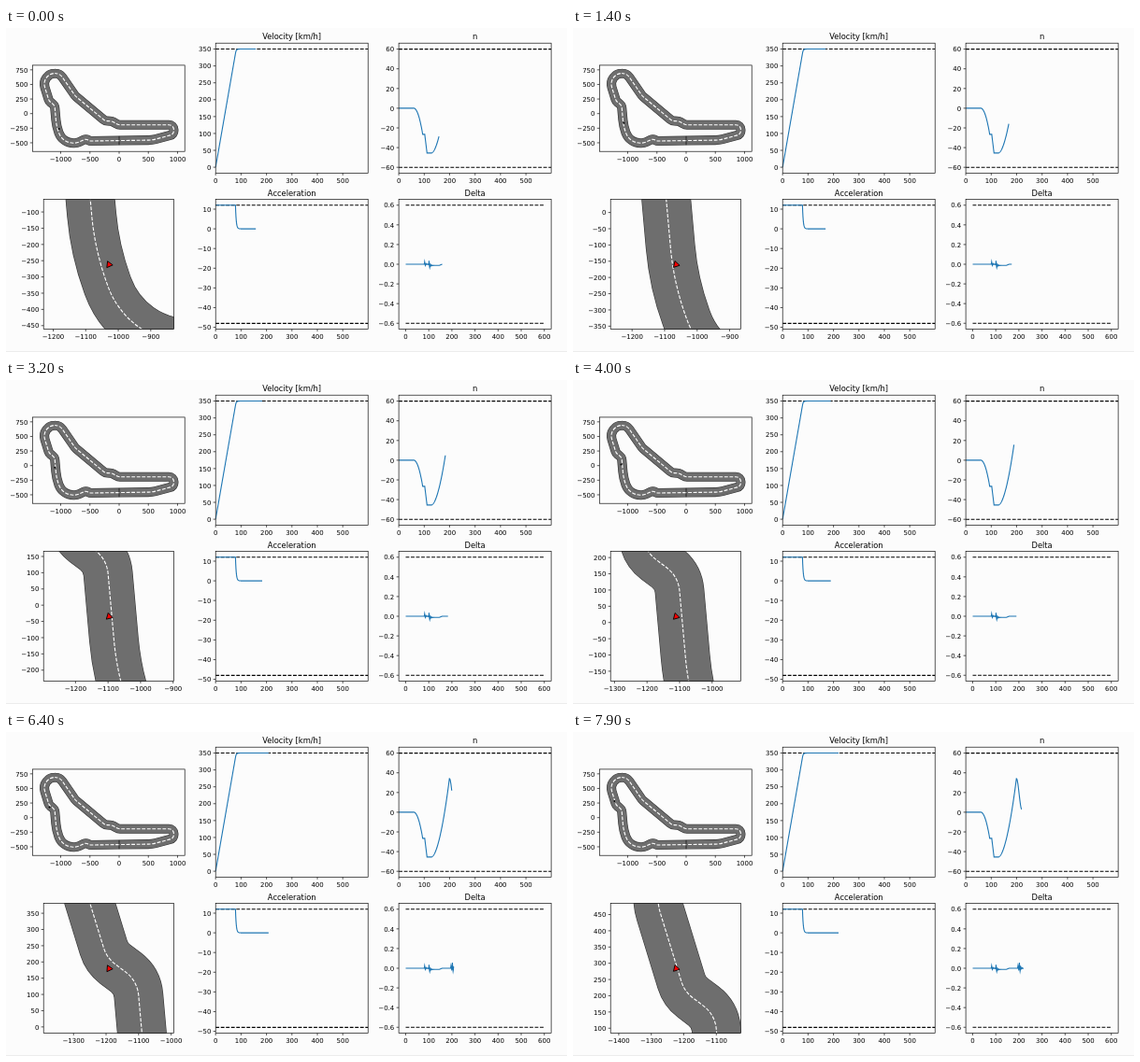
Write an HTML page with a canvas that moves like this. It is 600 px wide and 347 px high and loops after 8000 ms.

```html
<!DOCTYPE html>
<html>
<head>
<meta charset="utf-8">
<style>
html, body { margin: 0; width: 100%; height: 100%; overflow: hidden; background: #fcfcfc; }
canvas { display: block; }
</style>
</head>
<body>
<canvas id="stage" width="600" height="347"></canvas>
<script>
const ctx = document.getElementById('stage').getContext('2d');
const FONT = '"DejaVu Sans", sans-serif';
const PT = 50 / 72;                       // pixels per typographic point
const LINE = 1.6 * PT, THIN = .95 * PT;
const DASH = [5.55 * PT, 2.4 * PT];
const BLUE = '#1f77b4';

const ramp = (s, from, to) => Math.min(1, Math.max(0, (s - from) / (to - from)));
const smooth = (s, from, to) => {
  const x = ramp(s, from, to);
  return x * x * (3 - 2 * x);
};
const range = (from, to, step) => {
  const list = [];
  for (let v = Math.ceil(from / step) * step; v <= to + 1e-9; v += step) list.push(v);
  return list;
};

// Straights of the circuit meet in these corners: x, y, radius in metres
const corners = [
  [-500, -470, 80], [-568, -430, 80], [-720, -504, 200], [-968, -504, 265],
  [-1072, -218, 850], [-1104, 142, 100], [-1198, 213, 100], [-1345, 692, 185],
  [-1018, 692, 160], [-750, 302, 150], [-240, -124, 120], [-120, -130, 120],
  [-20, -192, 120], [935, -192, 82], [935, -355, 82], [560, -454, 500]
];
const START = [0, -462], ROAD = 150;

const circuit = new Path2D();
circuit.moveTo(...START);
corners.forEach(([x, y, r], i) => {
  const [nx, ny] = corners[i + 1] || START;
  circuit.arcTo(x, y, nx, ny, r);
});
circuit.closePath();

// Car position: tick, x, y; the outer two only set the direction at the ends
const drive = [
  [-10, -993, -327], [0, -1029.5, -260.6], [14, -1066, -159], [23, -1083.3, -94],
  [40, -1112, 19.6], [53, -1141, 110], [64, -1192, 181], [79, -1225, 285], [90, -1245, 365]
];

// Cubic Hermite curve through the waypoints
function carAt(u) {
  let i = 1;
  while (i < drive.length - 3 && drive[i + 1][0] < u) i++;
  const [a, b, c, d] = drive.slice(i - 1, i + 3);
  const h = c[0] - b[0], s = (u - b[0]) / h, r = 1 - s;
  return [1, 2].map(k => {
    const m0 = (c[k] - a[k]) / (c[0] - a[0]) * h;
    const m1 = (d[k] - b[k]) / (d[0] - b[0]) * h;
    return b[k] * (1 + 2 * s) * r * r + m0 * s * r * r + c[k] * s * s * (3 - 2 * s) - m1 * s * s * r;
  });
}

// Signals over the simulation step
const LAUNCH = 78, FADE = 3;
const accel = s => s < LAUNCH ? 12 : 12 * Math.exp((LAUNCH - s) / FADE);
const speed = s => s < LAUNCH ? 4.32 * s : 350 - 13 * Math.exp((LAUNCH - s) / FADE);
const offset = s =>
  -26.5 * ramp(s, 59, 94) ** 2 - 19 * ramp(s, 102, 111)
  + 79.5 * ramp(s, 128, 199) ** 1.8 - 31 * smooth(s, 199.5, 220);
const kick = (s, at, size) =>
  s < at - 1.5 ? 0 : size * Math.exp(-Math.abs(s - at) / 5) * Math.cos(s - at);
const steering = s =>
  kick(s, 82, .025) + kick(s, 101, .042) + kick(s, 196, .025) + kick(s, 202, .05)
  - .012 * smooth(s, 95, 105) * (1 - smooth(s, 143, 160));

function line(points, color, width, dash = []) {
  ctx.beginPath();
  for (const [x, y] of points) ctx.lineTo(x, y);
  ctx.strokeStyle = color;
  ctx.lineWidth = width;
  ctx.setLineDash(dash);
  ctx.stroke();
  ctx.setLineDash([]);
}

function text(str, x, y, size, align) {
  ctx.font = size * PT + 'px ' + FONT;
  ctx.textAlign = align;
  ctx.fillStyle = '#000';
  ctx.fillText(str, x, y);
}

const label = (v, digits) => v.toFixed(digits).replace('-', '\u2212');

// box: l, t, r, b; ox, oy: pixel of the value zero; kx, ky: pixels per unit
function axes(p, paint) {
  const px = v => p.ox + v * p.kx, py = v => p.oy - v * p.ky;
  ctx.save();
  ctx.beginPath();
  ctx.rect(p.l, p.t, p.r - p.l, p.b - p.t);
  ctx.clip();
  paint(px, py);
  ctx.restore();
  ctx.strokeStyle = '#000';
  ctx.lineWidth = THIN;
  ctx.strokeRect(p.l, p.t, p.r - p.l, p.b - p.t);
  for (const v of p.xt) {
    line([[px(v), p.b], [px(v), p.b + 2.5]], '#000', THIN);
    text(label(v, 0), px(v), p.b + 10.3, 10, 'center');
  }
  for (const v of p.yt) {
    line([[p.l - 2.5, py(v)], [p.l, py(v)]], '#000', THIN);
    text(label(v, p.digits || 0), p.l - 4.9, py(v) + 2.7, 10, 'right');
  }
  if (p.title) text(p.title, (p.l + p.r) / 2, p.t - 3.8, 12, 'center');
}

function drawTrack(p) {
  const k = p.kx;
  ctx.save();
  ctx.translate(p.ox, p.oy);
  ctx.scale(k, -k);
  const layers = [['#333', ROAD + .7 / k], ['#6e6e6e', ROAD - .5 / k], ['#fff', LINE / k]];
  layers.forEach(([color, width], i) => {
    ctx.strokeStyle = color;
    ctx.lineWidth = width;
    ctx.setLineDash(i === 2 ? DASH.map(d => d / k) : []);
    ctx.stroke(circuit);
  });
  ctx.restore();
}

const upper = { t: 16.2, b: 155.4 }, lower = { t: 183.4, b: 322.5 };
const column = l => ({ l, r: l + 163, ox: l, kx: .272, xt: range(0, 500, 100) });
const left = column(224.2), right = column(420.1);
const plots = [
  { ...left, ...upper, title: 'Velocity [km/h]', signal: speed, oy: 149.1, ky: .3616,
    yt: range(0, 350, 50), limits: [350] },
  { ...right, ...upper, title: 'n', signal: offset, oy: 85.9, ky: 1.055,
    yt: range(-60, 60, 20), limits: [60, -60] },
  { ...left, ...lower, title: 'Acceleration', signal: accel, oy: 215.1, ky: 2.109,
    yt: range(-50, 10, 10), limits: [12, -48] },
  { ...right, ...lower, title: 'Delta', signal: steering, oy: 253, ky: 105.4, digits: 1,
    ox: 427.5, kx: .247, xt: range(0, 600, 100),
    yt: range(-3, 3, 1).map(i => i / 5), limits: [.6, -.6] }
];

function drawPlot(p, step) {
  axes(p, (px, py) => {
    for (const v of p.limits) line([[px(0), py(v)], [px(600), py(v)]], '#000', LINE, DASH);
    const steps = [...range(0, step, 1), step];
    line(steps.map(s => [px(s), py(p.signal(s))]), BLUE, LINE);
  });
}

const overview = {
  l: 28.3, t: 39.9, r: 191.2, b: 132.2, ox: 121, oy: 91.7, kx: .0625, ky: .0625,
  xt: range(-1000, 1000, 500), yt: range(-500, 750, 250)
};

function drawOverview(x, y) {
  axes(overview, (px, py) => {
    drawTrack(overview);
    line([-75, 75].map(d => [px(0), py(START[1] + d)]), '#000', THIN);
    ctx.fillStyle = '#000';
    ctx.beginPath();
    ctx.arc(px(x), py(y), 1, 0, 7);
    ctx.fill();
  });
}

function drawCloseUp(x, y, heading) {
  const k = .3478, cx = 109.8, cy = 252.9;
  const view = {
    ...lower, l: 40.2, r: 179.4, ox: cx - x * k, oy: cy + y * k, kx: k, ky: k,
    xt: range(x - 200, x + 200, 100), yt: range(y - 200, y + 200, 50)
  };
  axes(view, () => {
    drawTrack(view);
    ctx.beginPath();
    for (const turn of [0, 1, 2]) {
      const a = heading + turn * Math.PI * 2 / 3;
      ctx.lineTo(cx + .4 + 4 * Math.cos(a), cy + .5 - 4 * Math.sin(a));
    }
    ctx.closePath();
    ctx.fillStyle = '#f00';
    ctx.fill();
    ctx.strokeStyle = '#000';
    ctx.lineWidth = .9;
    ctx.stroke();
  });
}

function draw(now) {
  const tick = Math.floor(now % 8000 / 100);
  const [x, y] = carAt(tick);
  const [x2, y2] = carAt(tick + .1);
  ctx.fillStyle = '#fcfcfc';
  ctx.fillRect(0, 0, 600, 347);
  ctx.fillStyle = '#ececec';
  ctx.fillRect(0, 346, 600, 1);
  drawOverview(x, y);
  drawCloseUp(x, y, Math.atan2(y2 - y, x2 - x));
  for (const p of plots) drawPlot(p, 158 + .785 * tick);
}

const start = performance.now();
function loop() {
  draw(performance.now() - start);
  requestAnimationFrame(loop);
}
loop();
</script>
</body>
</html>
```
